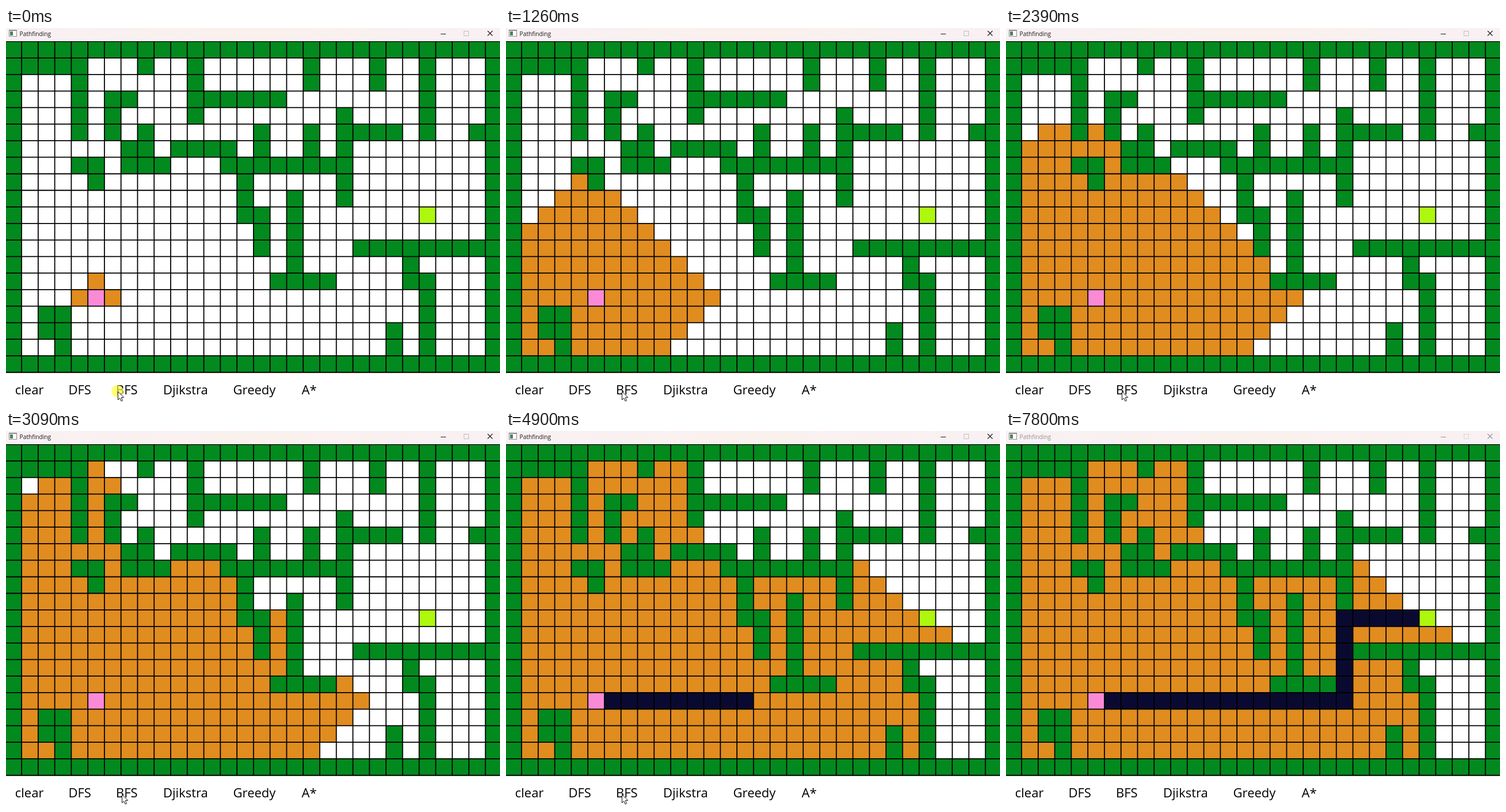
Animation, 858 px wide and 652 px high, one loop 7.87 s. Source, as an HTML page with a canvas:

```html
<!DOCTYPE html>
<html lang="en">
<head>
<meta charset="utf-8">
<title>Pathfinding</title>
<style>
  html, body { margin: 0; width: 858px; height: 652px; overflow: hidden; background: #fff; }
  canvas { display: block; }
</style>
</head>
<body>
<canvas id="stage" width="858" height="652"></canvas>
<script>
const ctx = document.getElementById('stage').getContext('2d');
const LOOP = 7870, STEP = 70.1;
const COLS = 30, ROWS = 20, SIZE = 28.77, LEFT = -1.67, TOP = 23.33;
const GREEN = '#028a1e', ORANGE = '#e08c1f', PINK = '#fb8ad6', LIME = '#aef70e', NAVY = '#0a0a30';
const start = [5, 15], goal = [25, 10];

// Inner walls: column, row, width, height
const walls = [
  [1,1,4,1], [4,2,1,4], [6,3,2,1], [6,4,1,2], [8,1,1,1], [11,1,1,4], [12,3,5,1], [18,1,1,2],
  [22,1,1,2], [25,1,1,5], [20,4,1,6], [21,5,3,1], [28,5,1,1], [15,5,1,2], [18,5,1,2], [8,5,1,1],
  [7,6,2,2], [9,7,1,1], [10,6,4,1], [13,7,7,1], [4,7,2,1], [5,8,1,1], [14,8,1,3], [15,10,1,3],
  [17,9,1,5], [16,14,4,1], [21,12,8,1], [24,13,1,2], [25,14,1,5], [23,17,1,2], [2,16,2,2], [3,18,1,1]
];
const isWall = (c, r) => c < 1 || r < 1 || c > COLS - 2 || r > ROWS - 2 ||
  walls.some(([x, y, w, h]) => c >= x && c < x + w && r >= y && r < y + h);

// Breadth-first search: cells in order of discovery, up to the goal
function search() {
  const seen = new Set([String(start)]), queue = [start];
  for (const [c, r] of queue) {
    for (const [dc, dr] of [[-1, 0], [1, 0], [0, -1], [0, 1]]) {
      const next = [c + dc, r + dr];
      if (String(next) === String(goal)) return queue.slice(1);
      if (seen.has(String(next)) || isWall(...next)) continue;
      seen.add(String(next));
      queue.push(next);
    }
  }
}
const visited = search();

// Shortest route: right, up, right
const route = [];
for (let c = 6; c <= 20; c++) route.push([c, 15]);
for (let r = 14; r >= 10; r--) route.push([20, r]);
for (let c = 21; c < 25; c++) route.push([c, 10]);

function cell([c, r], color) {
  ctx.fillStyle = color;
  ctx.fillRect(LEFT + c * SIZE, TOP + r * SIZE, SIZE, SIZE);
}

function line(color, width, ...points) {
  ctx.strokeStyle = color;
  ctx.lineWidth = width;
  ctx.beginPath();
  points.forEach(([x, y], i) => i ? ctx.lineTo(x, y) : ctx.moveTo(x, y));
  ctx.stroke();
}

function text(str, x, y, size, color) {
  ctx.font = `${size}px "Open Sans", "Noto Sans", sans-serif`;
  ctx.fillStyle = color;
  ctx.fillText(str, x, y);
}

function titleBar(active) {
  const bg = ctx.createLinearGradient(0, 0, 858, 0);
  bg.addColorStop(0, '#f8f0f3');
  bg.addColorStop(.5, '#faf1ee');
  bg.addColorStop(1, '#f8f0f3');
  ctx.fillStyle = bg;
  ctx.fillRect(0, 0, 858, 23);
  ctx.fillStyle = '#8c8c8c';
  ctx.fillRect(5, 3, 14, 12);
  ctx.fillStyle = '#fff';
  ctx.fillRect(6, 5, 12, 9);
  ctx.fillStyle = '#4f7f62';
  ctx.fillRect(7, 6, 5, 7);
  const ink = active ? '#1a1a1a' : '#979394';
  text('Pathfinding', 23.6, 13.5, 10.2, ink);
  line(ink, 1, [755, 10.5], [764, 10.5]);
  ctx.strokeStyle = active ? '#c4bdbe' : '#dcd6d7';
  ctx.strokeRect(795.5, 5.5, 8, 8);
  line(ink, 1.1, [836.5, 5], [845, 13.5]);
  line(ink, 1.1, [845, 5], [836.5, 13.5]);
}

function grid(k) {
  ctx.fillStyle = '#fff';
  ctx.fillRect(0, 23, 858, 629);
  for (let c = 0; c < COLS; c++)
    for (let r = 0; r < ROWS; r++)
      if (isWall(c, r)) cell([c, r], GREEN);

  const found = Math.floor(3.25 + 4.6 * k - .00135 * k * k);
  const traced = Math.floor(24 - (83 - Math.min(k, 83)) * 1.15);
  visited.slice(0, k > 62 ? visited.length : found).forEach(p => cell(p, ORANGE));
  route.slice(0, Math.max(0, traced)).forEach(p => cell(p, NAVY));
  cell(start, PINK);
  cell(goal, LIME);

  for (let c = 1; c < COLS; c++) {
    const x = LEFT + c * SIZE;
    line('#000', 1.8, [x, TOP], [x, TOP + ROWS * SIZE]);
  }
  for (let r = 0; r <= ROWS; r++) {
    const y = TOP + r * SIZE;
    line('#000', 1.8, [0, y], [858, y]);
  }
}

function menu() {
  const items = { clear: 15.8, DFS: 108.4, BFS: 191, Djikstra: 273, Greedy: 394.6, 'A*': 513.5 };
  for (const label in items) text(label, items[label], 637, 22, '#000');
}

function pointer(x, y) {
  ctx.beginPath();
  for (const [dx, dy] of [[0, 0], [0, 14.5], [3.3, 11.5], [5.6, 16.8], [8, 15.8], [5.8, 10.6], [10.2, 10.3]])
    ctx.lineTo(x + dx, y + dy);
  ctx.closePath();
  ctx.fillStyle = '#fff';
  ctx.fill();
  ctx.strokeStyle = '#111';
  ctx.lineWidth = 1;
  ctx.stroke();
}

function cursor(t, k) {
  if (k < 2) {
    ctx.fillStyle = 'rgba(255,255,60,.7)';
    ctx.beginPath();
    ctx.arc(193.5, 631.5, 10.5, 0, 7);
    ctx.fill();
  }
  if (t < 6940) pointer(194.5 + 7 * Math.min(1, k / 3), 632);
  else if (t < 7010) pointer(315, 640);
}

function draw() {
  const t = performance.now() % LOOP;
  const k = Math.floor((t + 9) / STEP);
  grid(k);
  titleBar(t < 7800);
  menu();
  cursor(t, k);
  requestAnimationFrame(draw);
}
draw();
</script>
</body>
</html>
```
